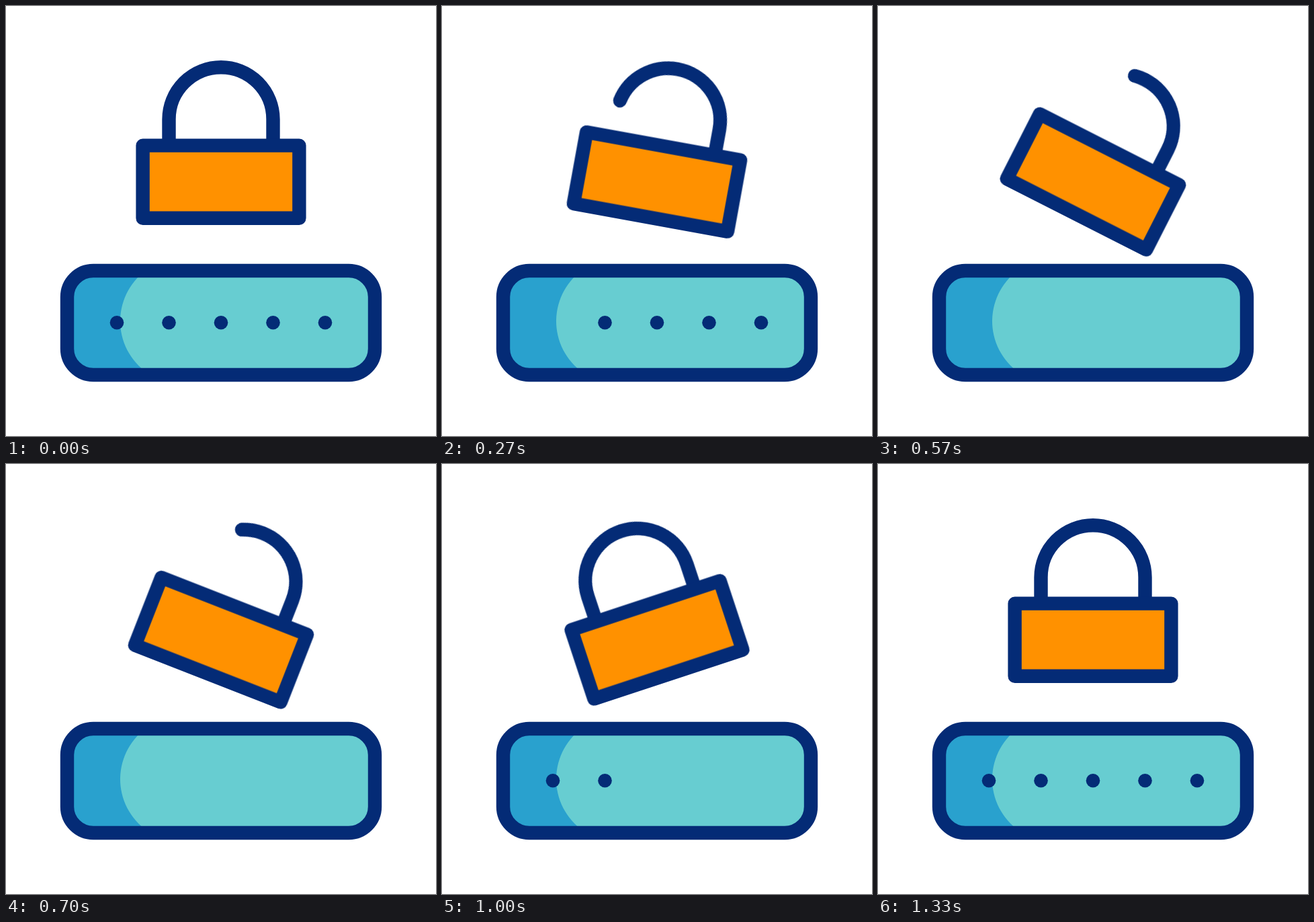
An HTML page without scripts for the animation above (2 s loop, 640 by 640 pixels).

```html
<!DOCTYPE html>
<html lang="en">
<head>
<meta charset="utf-8">
<title>Padlock and password</title>
<style>
  :root { --navy: #042b76; --ease: cubic-bezier(.333, 0, .667, 1); }
  html, body { margin: 0; width: 100%; height: 100%; overflow: hidden; background: #fff; }
  svg { display: block; width: 100%; height: 100%; }

  .line {
    fill: none;
    stroke: var(--navy);
    stroke-width: 20.4;
    stroke-linecap: round;
    stroke-linejoin: round;
  }
  .body { fill: #ff9100; }
  .field { fill: #67cdd1; }
  .shade { fill: #29a1ce; }

  .lock {
    transform-origin: 320px 261.7px;
    animation: swing 2s var(--ease) infinite;
  }
  .shackle {
    stroke-dasharray: 100 200;
    animation: open 2s var(--ease) infinite;
  }
  .dots circle {
    fill: var(--navy);
    animation: blank 2s step-end calc(var(--i) * 2s / 30) infinite;
  }

  @keyframes swing {
    0%, 1% { transform: rotate(0deg); }
    31.3% { transform: rotate(27.6deg); }
    48% { transform: rotate(-20.8deg); }
    58.3% { transform: rotate(3.7deg); }
    66.6%, 100% { transform: rotate(0deg); }
  }
  @keyframes open {
    0%, 1% { stroke-dashoffset: 0; }
    31.3% { stroke-dashoffset: 46; }
    48%, 100% { stroke-dashoffset: 0; }
  }
  /* Each dot is hidden for a third of the loop, two ticks after its neighbour. */
  @keyframes blank {
    0% { opacity: 1; }
    13.3% { opacity: 0; }
    46.6%, 100% { opacity: 1; }
  }
</style>
</head>
<body>
<svg viewBox="0 0 640 640">
  <g class="lock">
    <path class="line shackle" pathLength="100" d="M397.5 207.5V168.7a77.5 77.5 0 0 0-155 0V207.5"/>
    <rect class="line body" x="203.6" y="207.6" width="232.8" height="108.2"/>
  </g>

  <rect class="field" x="91" y="394" width="458" height="155" rx="39"/>
  <path class="shade" d="M207.7 394A93.5 93.5 0 0 0 215 549H130a39 39 0 0 1-39-39V433a39 39 0 0 1 39-39z"/>
  <rect class="line" x="91" y="394" width="458" height="155" rx="39"/>

  <g class="dots">
    <circle cx="165" cy="471.3" r="10.3" style="--i:0"/>
    <circle cx="242.5" cy="471.3" r="10.3" style="--i:1"/>
    <circle cx="320" cy="471.3" r="10.3" style="--i:2"/>
    <circle cx="397.5" cy="471.3" r="10.3" style="--i:3"/>
    <circle cx="475" cy="471.3" r="10.3" style="--i:4"/>
  </g>
</svg>
</body>
</html>
```
